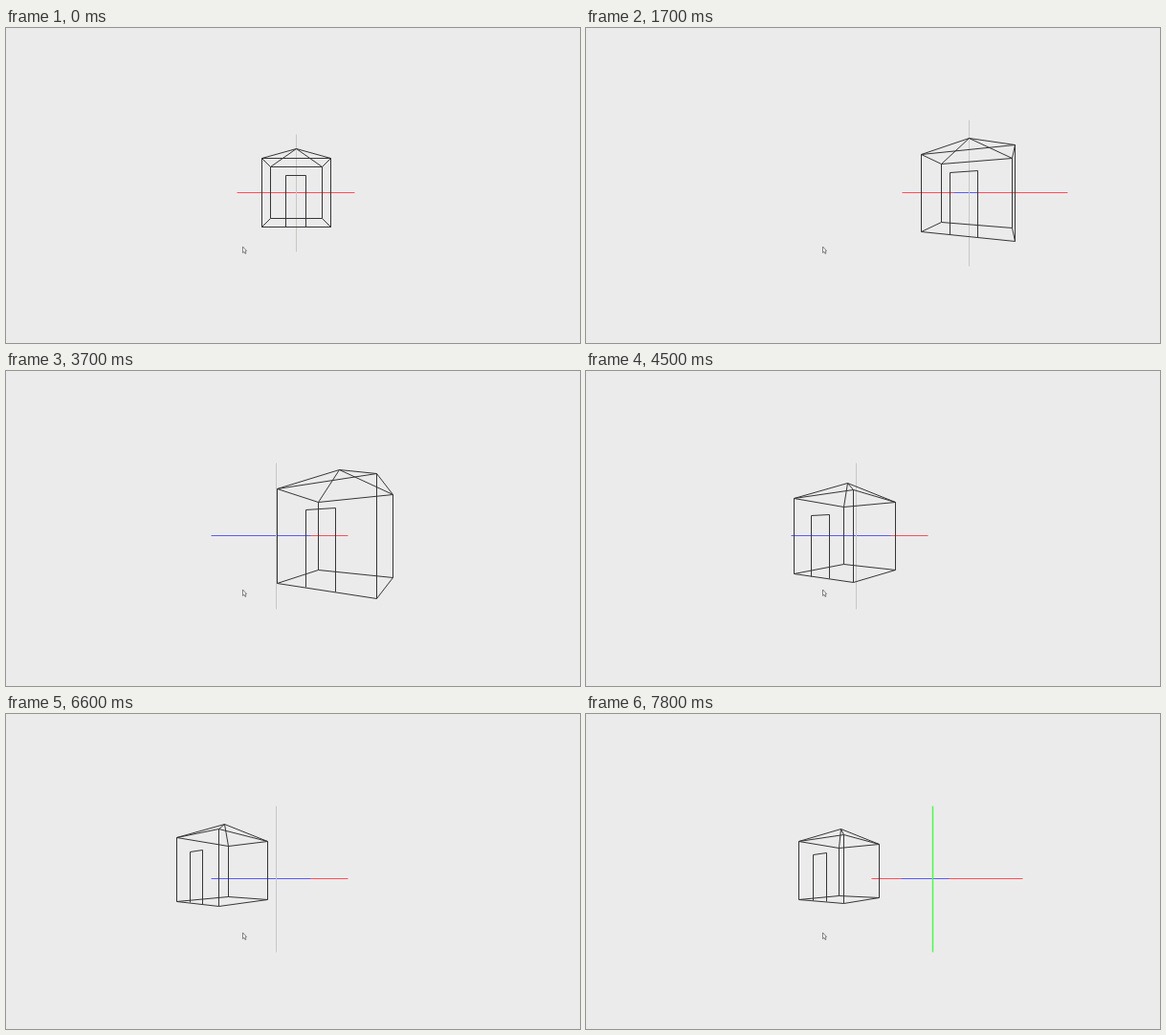
Write an HTML page with a canvas that moves like this. It is 600 by 330 pixels and loops after 8000 ms.

```html
<!DOCTYPE html>
<html lang="en">
<head>
<meta charset="utf-8">
<title>Wireframe house</title>
<style>
  html, body { margin: 0; width: 100%; height: 100%; overflow: hidden; background: #ecebec; }
  canvas { display: block; width: 600px; height: 330px; }
</style>
</head>
<body>
<canvas id="stage" width="600" height="330"></canvas>
<script>
const ctx = document.getElementById('stage').getContext('2d');
const LOOP = 8000, TICK = 100;
const CENTER = { x: 303.1, y: 172.9 }, FOCAL = 216, ORBIT = 5;
const STEP = 0.1, YAW_STEP = Math.PI / 90;
const REPEAT_DELAY = 280, REPEAT_RATE = 0.04;

// A held key moves one step when pressed, then repeats until the goal is reached.
const press = (part, at, goal, delay = REPEAT_DELAY) => ({ part, at, goal, delay });
const presses = [
  press('dolly', 50, 14, 0),
  press('yaw', 890, 16),
  press('strafe', 1610, -32),
  press('houseX', 2960, 18),
  press('houseX', 4010, -14, 0),
  press('houseY', 5000, 12),
  press('houseY', 5950, 3, 0),
  press('houseX', 6190, -15),
  press('houseX', 6400, -33, 80),
  press('strafe', 7020, -11)
];

function stateAt(time) {
  const state = { dolly: 20, yaw: 0, strafe: 0, houseX: 0, houseY: 0 };
  for (const { part, at, goal, delay } of presses) {
    if (time < at) break;
    const repeats = Math.max(0, Math.ceil((time - at - delay) * REPEAT_RATE));
    const rest = goal - state[part];
    state[part] += Math.sign(rest) * Math.min(Math.abs(rest), 1 + repeats);
  }
  return state;
}

const square = [0, 1, 2, 3].map(i => [i % 3 ? 1 : -1, i < 2 ? 1 : -1]);
const apex = [0, 1.5, 0];
const houseEdges = square.flatMap(([x, z], i) => {
  const [nextX, nextZ] = square[(i + 1) % 4];
  return [
    [[x, -1, z], [nextX, -1, nextZ]],
    [[x, 1, z], [nextX, 1, nextZ]],
    [[x, -1, z], [x, 1, z]],
    [[x, 1, z], apex]
  ];
});
for (const x of [-0.3, 0.3]) houseEdges.push([[x, -1, 1], [x, 0.5, 1]]);
houseEdges.push([[-0.3, 0.5, 1], [0.3, 0.5, 1]]);

function makeProjector({ dolly, yaw, strafe }) {
  const c = Math.cos(yaw * YAW_STEP), s = Math.sin(yaw * YAW_STEP);
  return ([x, y, z]) => {
    const forward = ORBIT - z;
    const scale = FOCAL / (dolly * STEP - s * x + c * forward);
    return [
      Math.floor(CENTER.x + (strafe * STEP + c * x + s * forward) * scale) + 0.5,
      Math.floor(CENTER.y - y * scale) + 0.5
    ];
  };
}

function line(from, to, color, width = 1) {
  ctx.strokeStyle = color;
  ctx.lineWidth = width;
  ctx.beginPath();
  ctx.moveTo(...from);
  ctx.lineTo(...to);
  ctx.stroke();
}

function drawCursor() {
  ctx.fillStyle = '#fff';
  ctx.strokeStyle = '#666';
  ctx.lineWidth = 0.8;
  const outline = new Path2D('M247.5 229v6.5l1.5-1.2 1 2.2 1-.5-1-2.2 1.5-.3z');
  ctx.fill(outline);
  ctx.stroke(outline);
}

function draw(time) {
  const state = stateAt(Math.floor(time / TICK) * TICK);
  const project = makeProjector(state);

  ctx.fillStyle = '#ecebec';
  ctx.fillRect(0, 0, 600, 330);

  const axis = (end, color, width) =>
    line(project(end.map(v => -v)), project(end), color, width);
  const lit = time >= 7800;
  axis([2, 0, 0], '#fb505a');
  axis([0, 0, 2], '#5c5cf7');
  axis([0, 2, 0], lit ? '#4dfa4d' : '#c6c8c4', lit ? 1.5 : 1);

  const place = ([x, y, z]) => project([x + state.houseX * STEP, y + state.houseY * STEP, z]);
  for (const [a, b] of houseEdges) line(place(a), place(b), '#363636');

  drawCursor();
}

const began = performance.now();
function frame() {
  draw((performance.now() - began) % LOOP);
  requestAnimationFrame(frame);
}
frame();
</script>
</body>
</html>
```
